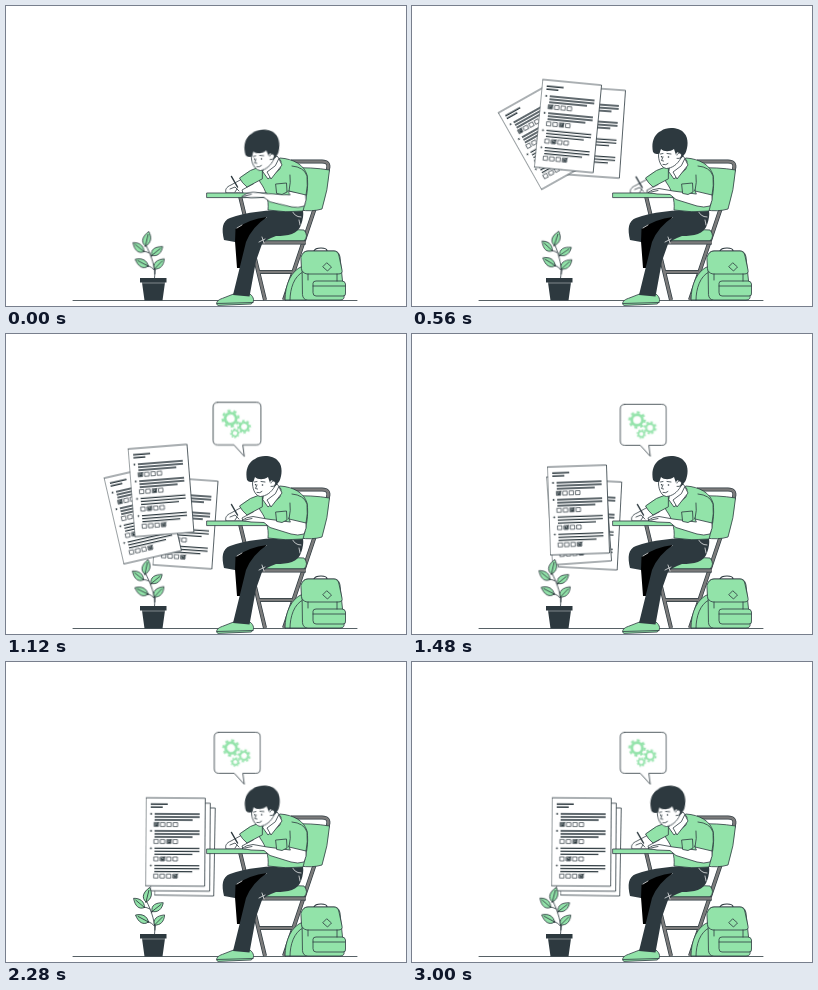
An HTML page without scripts for the animation above (3.04 s loop, 400 by 300 pixels).

```html
<!DOCTYPE html>
<html lang="en">
<head>
<meta charset="utf-8">
<title>Student at a desk</title>
<style>
html, body { margin: 0; width: 100%; height: 100%; overflow: hidden; background: #fff; }
svg { display: block; width: 100vw; height: 100vh; }
:root { --ink: #2d393f; --green: #92e3a9; --loop: 3040ms; }

.o { stroke: var(--ink); stroke-width: .8; stroke-linejoin: round; stroke-linecap: round; }
.g { fill: var(--green); }
.w { fill: #fff; }
.d { fill: var(--ink); }
.n { fill: none; }
.l { fill: none; stroke: var(--ink); stroke-width: 1.35; }
.tube { fill: none; stroke: var(--ink); stroke-width: 4; stroke-linejoin: round; }
.tube + .tube { stroke: #7b7b7b; stroke-width: 2.6; }
.crease { fill: none; stroke: #fff; stroke-width: .7; stroke-linecap: round; }

.back, .mid, .front, .bubble, .head, .arm, .plant, .cog {
  animation: var(--loop) linear infinite;
}
.back { animation-name: back; }
.mid { animation-name: mid; }
.front { animation-name: front; }
.sheets { animation: fade var(--loop) linear infinite; }
.bubble { animation-name: bubble; }
.head { animation-name: nod; animation-timing-function: ease-in-out; transform-origin: 266px 163px; }
.arm { animation-name: arm; transform-origin: 298px 194px; }
.hand { animation: write 380ms ease-in-out infinite; }
.plant { animation-name: sway; animation-timing-function: ease-in-out; transform-origin: 148px 272px; }
.cog { animation-name: spin; }
.ccw { animation-direction: reverse; }

@keyframes fade { 0% { opacity: 0; } 11% { opacity: 1; } 100% { opacity: 1; } }
@keyframes front {
  0% { transform: translate(157px, 116px) rotate(6deg); animation-timing-function: ease-in; }
  18.42% { transform: translate(156px, 120px) rotate(5.5deg); }
  26.32% { transform: translate(153.5px, 144.5px) rotate(-3deg); }
  36.84% { transform: translate(155px, 156.5px) rotate(-4.5deg); }
  48.68% { transform: translate(166.5px, 176px) rotate(-2deg); animation-timing-function: ease-out; }
  57%, 100% { transform: translate(169.5px, 180px) rotate(.4deg); }
}
@keyframes mid {
  0% { transform: translate(136px, 126px) rotate(-25deg); animation-timing-function: ease-in; }
  18.42% { transform: translate(133.7px, 130.5px) rotate(-29.4deg); }
  26.32% { transform: translate(130.3px, 164.8px) rotate(-19.3deg); }
  36.84% { transform: translate(136.7px, 180.4px) rotate(-13deg); }
  48.68% { transform: translate(167px, 185px) rotate(-4deg); animation-timing-function: ease-out; }
  57%, 100% { transform: translate(174.5px, 185px) rotate(.4deg); }
}
@keyframes back {
  0% { transform: translate(181px, 121px) rotate(4deg); animation-timing-function: ease-in; }
  18.42% { transform: translate(181px, 126px) rotate(4deg); }
  26.32% { transform: translate(179.5px, 175.5px) rotate(4deg); }
  36.84% { transform: translate(179.5px, 189px) rotate(4deg); }
  48.68% { transform: translate(178px, 190.5px) rotate(3deg); animation-timing-function: ease-out; }
  57%, 100% { transform: translate(179px, 189.5px) rotate(1deg); }
}
@keyframes bubble {
  0%, 20% { transform: translate(228px, 128px) scale(.3); opacity: 0; }
  26.32% { transform: translate(229px, 114px) scale(.68); opacity: .7; }
  32% { transform: translate(231px, 86px) scale(1.12); opacity: 1; }
  36.84% { transform: translate(231px, 89.6px) scale(1.04); opacity: 1; }
  41%, 100% { transform: translate(231.3px, 90.8px) scale(1); opacity: 1; }
}
@keyframes nod {
  0% { transform: translateY(1px) rotate(-5deg); }
  13%, 52% { transform: none; }
  75% { transform: translateY(1px) rotate(-4deg); }
  100% { transform: translateY(1px) rotate(-5deg); }
}
@keyframes arm {
  0% { transform: rotate(-4deg); }
  6%, 100% { transform: none; }
}
@keyframes write {
  0%, 100% { transform: none; }
  50% { transform: translate(-1.4px, .5px); }
}
@keyframes sway {
  0% { transform: rotate(-1deg); }
  17% { transform: rotate(4deg); }
  36% { transform: rotate(-2deg); }
  50% { transform: rotate(-1deg); }
  75% { transform: none; }
  88% { transform: rotate(1.6deg); }
  100% { transform: rotate(.6deg); }
}
@keyframes spin { to { transform: rotate(180deg); } }
</style>
</head>
<body>
<svg viewBox="0 0 400 300" xmlns="http://www.w3.org/2000/svg">
  <defs>
    <g id="task">
      <circle cx="-24.5" cy="0" r=".9" class="d"/>
      <path class="l" d="M-21 0H24M-21 3H24M-21 6H17"/>
      <path class="o w" style="stroke-width:.7" d="M-21.2 8.6h4v4h-4zM-14.8 8.6h4v4h-4zM-8.4 8.6h4v4h-4zM-2 8.6h4v4h-4z"/>
    </g>
    <path id="tick" class="o d" style="stroke-width:.6" d="M-20.4 9.6h2.6v2.4h-2.6zl1.4 1.6 2.4 -3"/>
    <g id="sheet">
      <rect x="-29.5" y="-44" width="59" height="88" class="o w"/>
      <path class="l" d="M-25 -37.8H-8M-25 -34.8H-13"/>
      <use href="#task" y="-28"/><use href="#tick" y="-28"/>
      <use href="#task" y="-11"/><use href="#tick" x="12.8" y="-11"/>
      <use href="#task" y="6.4"/><use href="#tick" x="6.4" y="6.4"/>
      <use href="#task" y="23.6"/><use href="#tick" x="19.2" y="23.6"/>
    </g>
    <g id="gear" fill="none" stroke="#92e3a9">
      <circle r="5.3" stroke-width="2.8"/>
      <circle r="7.6" stroke-width="2.2" pathLength="16" stroke-dasharray="1 1"/>
    </g>
    <path id="leaf" d="M0 0C-6 -3 -5 -9 0 -15C4.500 -10 5 -4 0 0ZM0 0V-12" class="o g"/>
  </defs>

  <path d="M67 294.500H351" class="o"/>

  <!-- chair -->
  <g>
    <path class="tube" d="M285 155.500H316Q324 155.500 322 163L278 294"/>
    <path class="tube" d="M285 155.500H316Q324 155.500 322 163L278 294"/>
  </g>
  <g>
    <path class="tube" d="M234 190L259 294M253 266H286"/>
    <path class="tube" d="M234 190L259 294M253 266H286"/>
  </g>
  <path class="o g" d="M284 162Q306 161 323.500 164Q322 184 316 203Q306 206 294 204Z"/>
  <path class="o g" d="M236 226Q268 222 298 224Q303 230 298 235H238Q232 233 236 226Z"/>
  <g>
    <path class="tube" d="M234 236.500H300"/>
    <path class="tube" d="M234 236.500H300"/>
  </g>

  <!-- backpack -->
  <path class="o g" d="M297 260C285 264 279 279 279 294H300Z"/>
  <path class="o n" d="M297 266C288 270 284 283 284 294"/>
  <path class="o n" d="M308 245Q309 242 315 242T321 245" style="stroke-width:1.2"/>
  <path class="o g" d="M296 250Q297 245 302 245H328Q333 245 334 251L338 289Q339 294 334 294H302Q297 294 296.500 289Z"/>
  <path class="o g" d="M295 251Q297 245 302 245H328Q332 245 333 250L336 264Q337 268 332 268H301Q296 267 295.500 263Z"/>
  <path class="o g" d="M307 277Q307 275 310 275H336Q339 275 339.500 278V287Q340 290 337 290H310Q307 290 307 287Z"/>
  <path class="o n" d="M307 280H339M302 268V274M331 268V275"/>
  <path class="o n" d="M321 257L325.500 261L321.500 265L317 261Z"/>

  <g class="sheets">
    <use href="#sheet" class="back"/>
    <use href="#sheet" class="mid"/>
    <use href="#sheet" class="front"/>
  </g>

  <!-- plant -->
  <g class="plant">
    <path class="o n" d="M148.500 273C150 262 146 250 140 238M148.500 264Q146 261 142 259.500M149 268Q149 265 150 262M144 247Q141 245.500 138 245M145.500 251L147 248"/>
    <use href="#leaf" transform="translate(140 240) rotate(14)"/>
    <use href="#leaf" transform="translate(138.500 245.500) rotate(-50) scale(.95)"/>
    <use href="#leaf" transform="translate(146 249.500) rotate(52) scale(.95)"/>
    <use href="#leaf" transform="translate(142.500 260) rotate(-62) scale(.98)"/>
    <use href="#leaf" transform="translate(148.500 263) rotate(45) scale(.95)"/>
  </g>
  <path class="d" d="M134 272H160.500V276.500H159L156.500 294.500H138.500L136 276.500H134Z"/>
  <path d="M136 277H159" stroke="#fff" stroke-width=".4"/>

  <!-- thought bubble -->
  <g class="bubble">
    <path class="o w" d="M-18.500 -20.500H18.500Q23 -20.500 23 -16V16Q23 20.500 18.500 20.500H5.500L7 31.500L-3 20.500H-18.500Q-23 20.500 -23 16V-16Q-23 -20.500 -18.500 -20.500Z"/>
    <g transform="translate(-6.200 -4.800)"><use href="#gear" class="cog"/></g>
    <g transform="translate(6.800 3) scale(.75)"><use href="#gear" class="cog ccw"/></g>
    <g transform="translate(-2 9.200) scale(.54)"><use href="#gear" class="cog ccw"/></g>
  </g>

  <!-- legs -->
  <path class="o g" d="M228 288H244C248 291 249 296 245 298L212 299.400C209 298 211 294 216 292.500Z"/>
  <path class="o n" d="M211 297.500L247 296.500"/>
  <path fill="#000" d="M228 222L240 211L262 208L250 230L240 262L231 262Z"/>
  <path class="d" d="M297 204C272 203 242 205 224 212C216 215 215.500 223 218 234L229 236L229.500 223Q243 213 261 211Q246 221 240 236L227 289L243.500 290.500L250 255L256 238Q259 234 270 230C282 230 292 228 295 219Q298 211 297 204Z"/>
  <path class="crease" d="M253 236L259 233M256 231L258 237M286 204Q288 211 295 211M293 214L294 219M231 222L236 219"/>

  <!-- body -->
  <path class="o g" d="M259 161L274 152C288 153 298 159 301 169C303 181 300 194 297 205Q280 207 262 204C263 194 260 184 254 176L250 165Z"/>

  <!-- writing arm -->
  <g class="hand">
    <path class="o w" d="M236 173L225 179C220 181 219 184 220 187H237L236 184L247 178Z"/>
    <path class="o n" d="M224 183L229 181L233 185M229 186L231 183"/>
    <path d="M225.500 170.500L231.500 181" class="o" style="stroke-width:1.5"/>
  </g>
  <path class="o g" d="M256 160Q244 163 233.500 172Q236 177 241 181L256 173Z"/>

  <path class="o g" d="M201 187H261V191.600H201Z"/>

  <!-- resting arm -->
  <g class="arm">
    <path class="o w" d="M283 184L300 187Q301 195 298 200Q292 202 285 200L264 193.500L258 188.500L245 188L236 186.500Q240 183 247 182.500L261 185L284 188Z"/>
    <path class="o n" d="M239 186L246 184.500"/>
  </g>
  <path class="o g" d="M286 160Q298 161 301 170Q302 180 300 189L283 185Q285 176 284 169"/>
  <path class="o g" d="M270 178L280.500 177L281 186L276 188.500L271 187.500Z"/>

  <!-- head -->
  <path class="o w" d="M258 158L271 150L275 155L274 163L262 173L257 166Z"/>
  <g class="head">
    <path class="o w" d="M247.500 138L246.500 150C247 157 250 162 254.500 162.500C260 162 265 159 269 152L269 137Z"/>
    <path class="d" d="M241 146C239 137 242 128 249 125C256 120 268 122 272 127C277 132 276 141 273.500 147Q271 151 268 153L267 147Q264.500 145 264 149L262 143C258 146 252 146 249 143L247.500 147.500Q243 149 241 146Z"/>
    <path class="o w" d="M265 149C266 145.500 270 147 269.500 150Q268 153.500 265 152.500"/>
    <path class="o n" d="M248.500 148L251 147.500M255 147.500L259 148M251 151L249.500 154.500L251.500 155M251 158.500Q254 159.500 256 157.500"/>
    <circle cx="249.600" cy="150.800" r=".8" class="d"/>
    <circle cx="256.500" cy="151" r=".8" class="d"/>
  </g>
  <path class="o w" d="M273 153L276 159L265 173L261 166L269 160Z"/>
</svg>
</body>
</html>
```
